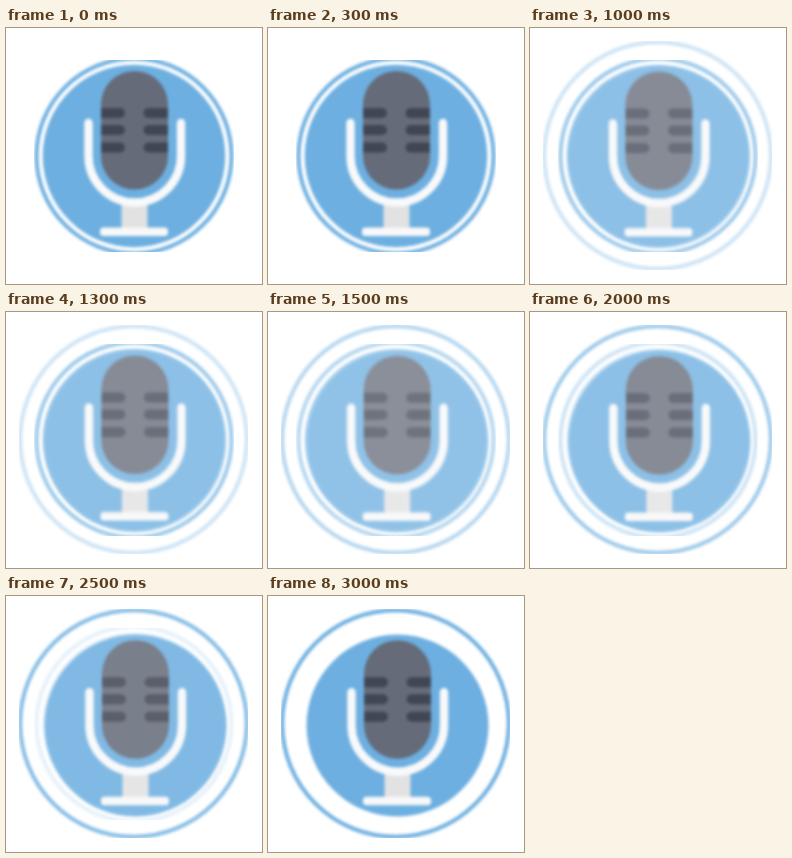
An HTML page that plays this animation: 256 by 256 pixels, repeating every 3.5 s.

```html
<!DOCTYPE html>
<html lang="en">
<head>
<meta charset="utf-8">
<title>Microphone crossfade</title>
<style>
  html, body { margin: 0; width: 100%; height: 100%; overflow: hidden; background: #fff; }
  svg { display: block; width: 100vw; height: 100vh; }
</style>
</head>
<body>
<svg viewBox="0 0 256 256">
  <defs>
    <filter id="soft" filterUnits="userSpaceOnUse" x="0" y="0" width="256" height="256" color-interpolation-filters="sRGB">
      <feGaussianBlur stdDeviation="1.8"/>
    </filter>
    <clipPath id="discBox"><rect x="28" y="32" width="200" height="192"/></clipPath>
    <clipPath id="ringBox"><rect x="13" y="13" width="229" height="229"/></clipPath>
    <clipPath id="headShape"><rect x="95" y="43" width="67" height="118.500" rx="33.500"/></clipPath>
    <g id="mic">
      <rect x="115.500" y="175" width="26" height="27" fill="#e2e2e3"/>
      <path d="M82.500 95V128a46.250 46.500 0 0 0 92.500 0V95" fill="none" stroke="#f8f9fa" stroke-width="8.400" stroke-linecap="round"/>
      <rect x="94" y="199.500" width="68" height="8.500" rx="3.500" fill="#f8f8f9"/>
      <g clip-path="url(#headShape)">
        <rect x="95" y="43" width="67" height="119" fill="#656b79"/>
        <path d="M88 85H114M142.500 85H170M88 102H114M142.500 102H170M88 119.500H114M142.500 119.500H170"
              stroke="#414655" stroke-width="10" stroke-linecap="round"/>
      </g>
    </g>
  </defs>
  <g id="full" clip-path="url(#discBox)">
    <g filter="url(#soft)">
      <circle cx="128" cy="128" r="97.500" fill="none" stroke="#6dafe0" stroke-width="4"/>
      <circle cx="128" cy="128" r="91.300" fill="#6dafe0"/>
      <use href="#mic"/>
    </g>
  </g>
  <g id="ringed" clip-path="url(#ringBox)">
    <g filter="url(#soft)">
      <circle cx="127.500" cy="127.500" r="113.300" fill="none" stroke="#6dafe0" stroke-width="4"/>
      <circle cx="129.500" cy="129.500" r="91" fill="#6dafe0"/>
      <use href="#mic" x="1" y="1.200"/>
    </g>
  </g>
</svg>
<script>
  const LOOP = 3500, HOLD = 500, LAST = LOOP / HOLD - 1;
  const full = document.getElementById('full');
  const ringed = document.getElementById('ringed');

  // The crossfade advances in held steps, then cuts back to the start.
  function draw(ms) {
    const mix = Math.floor((ms % LOOP) / HOLD) / LAST;
    full.setAttribute('opacity', 1 - mix);
    ringed.setAttribute('opacity', mix);
  }

  function tick() {
    draw(performance.now());
    requestAnimationFrame(tick);
  }
  tick();
</script>
</body>
</html>
```
